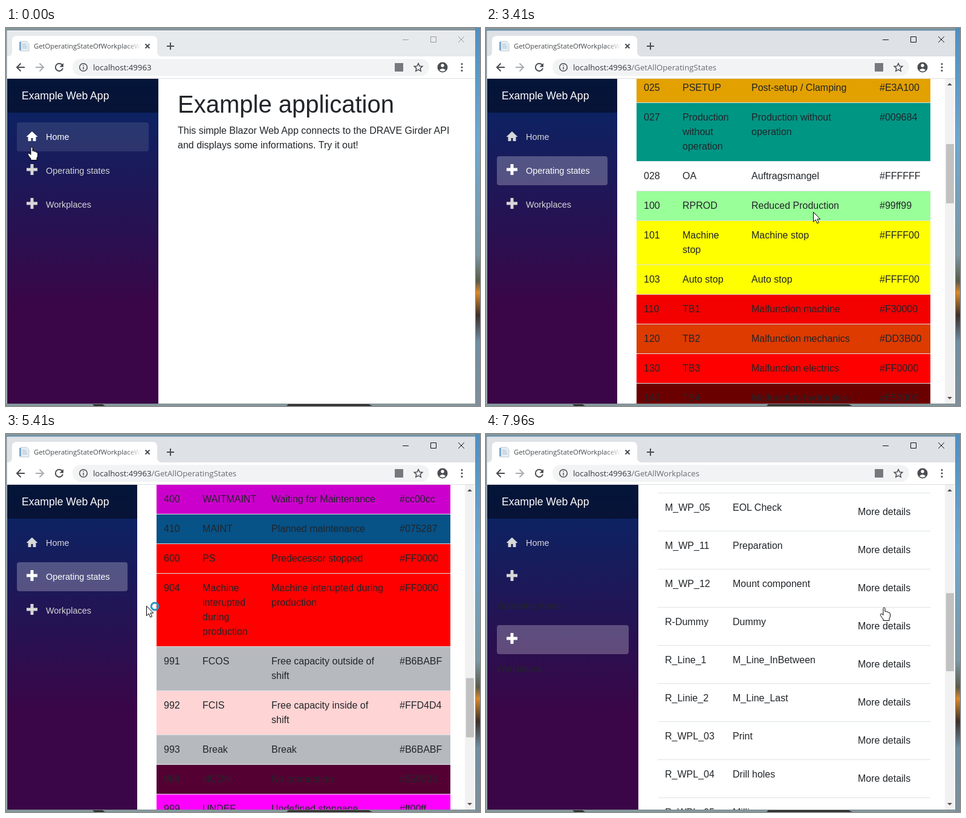
An HTML page for the animation above (8000 ms loop, 784 px wide and 625 px high).

```html
<!DOCTYPE html>
<html lang="en">
<head>
<meta charset="utf-8">
<title>Example Web App</title>
<style>
html, body { margin: 0; width: 100%; height: 100%; overflow: hidden; }
svg { display: block; width: 784px; height: 625px; font-family: "Liberation Sans", Arial, sans-serif; }
.ui { font-family: "Open Sans", "Noto Sans", sans-serif; }
.line { fill: none; stroke: #4a4d51; stroke-width: 2; }
.page { font-size: 16px; fill: #212529; }
.h1 { font-size: 40px; }
.b { font-weight: bold; }
</style>
</head>
<body>
<svg id="stage" viewBox="0 0 784 625">
  <defs>
    <linearGradient id="sky" x2="0" y2="1">
      <stop offset="0" stop-color="#4f8fc0"/><stop offset=".3" stop-color="#6fa8cf"/>
      <stop offset=".6" stop-color="#7c98a4"/><stop offset=".67" stop-color="#5b5a4a"/>
      <stop offset=".7" stop-color="#d78a2c"/><stop offset=".76" stop-color="#3c2f2a"/>
      <stop offset=".83" stop-color="#6f8fa3"/><stop offset="1" stop-color="#7f8f98"/>
    </linearGradient>
    <linearGradient id="side" gradientUnits="userSpaceOnUse" x1="0" y1="84" x2="0" y2="460">
      <stop offset="0" stop-color="#052767"/><stop offset="1" stop-color="#3a0647"/>
    </linearGradient>
    <linearGradient id="fade">
      <stop offset="0" stop-color="#fff" stop-opacity="0"/><stop offset="1" stop-color="#fff"/>
    </linearGradient>
    <clipPath id="view"><rect x="217" y="84" width="557" height="537"/></clipPath>
    <clipPath id="tabClip"><rect x="46" y="18" width="176" height="24"/></clipPath>
  </defs>

  <rect width="784" height="625" fill="#84989c"/>
  <rect x="776" width="8" height="625" fill="url(#sky)"/>
  <path d="M142 621h16l6 4h-18ZM468 621h130l8 4h-142Z" fill="#33302e"/>

  <rect x="1" y="3.5" width="775.5" height="618" fill="#fff" stroke="#7e8b92"/>
  <path id="edge" d="M1 4H776" stroke="#2f7fbd"/>
  <rect id="bar" x="2" y="4.500" width="774" height="42.500"/>
  <path d="M2 47Q10 47 10 39V21Q10 13 18 13H242Q250 13 250 21V39Q250 47 258 47Z" fill="#fff"/>
  <g id="doc">
    <path d="M24 22h10l4 4v12H24Z" fill="#e6edf3" stroke="#b4c3d0" stroke-width=".8"/>
    <path d="M22 23h3v14h-3Z" fill="#79a9d4"/>
    <path d="M27 27h6M27 30h8M27 33h8" stroke="#9db4c8"/>
  </g>
  <g id="globe">
    <circle cx="30" cy="30" r="7.500" fill="#54585d"/>
    <path d="M25 27l5-2 2 3-4 2-3 1ZM31 31l4-1-1 4-3 2Z" fill="#fff"/>
  </g>
  <text class="ui" x="46" y="34" font-size="11.300" fill="#45494d" clip-path="url(#tabClip)">GetOperatingStateOfWorkplaceW</text>
  <rect x="198" y="18" width="25" height="24" fill="url(#fade)"/>
  <path class="line" stroke-width="1.600" d="M230.500 26.500l7 7m0-7l-7 7M266 30h12m-6-6v12"/>
  <path id="buttons" fill="none" d="M656 19.500h10M702.500 14.500h9v9h-9ZM748 14l10 10m0-10l-10 10"/>

  <path class="line" d="M31 65H18.500M24.500 58.500L18 65l6.500 6.500"/>
  <path class="line" style="stroke:#a9adb1" d="M49 65H61.500M55.500 58.500L62 65l-6.500 6.500"/>
  <path class="line" d="M93.500 62A6.200 6.200 0 1 0 94 66.500"/>
  <path d="M95 58V64.500H88.500Z" fill="#4a4d51"/>
  <rect x="110" y="51" width="590" height="28" rx="14" fill="#f1f3f4"/>
  <circle class="line" style="stroke-width:1.500" cx="128" cy="65" r="6.300"/>
  <path class="line" style="stroke-width:1.500" d="M128 64v4.500M128 61v1.600"/>
  <text class="ui" x="144" y="70" font-size="13.200" fill="#33363a">localhost:49963<tspan id="path" fill="#686c71"></tspan></text>
  <rect x="643" y="58" width="14" height="14" fill="#75797d"/>
  <path class="line" style="stroke-width:1.500" d="M682 58.500l2 4.400 4.800.5-3.600 3.200 1 4.700-4.200-2.400-4.200 2.400 1-4.700-3.600-3.200 4.800-.5Z"/>
  <circle cx="722" cy="65" r="8.500" fill="#4a4d51"/>
  <circle cx="722" cy="62" r="2.700" fill="#fff"/>
  <path d="M716.800 69.500Q722 64.500 727.200 69.500 722 74 716.800 69.500Z" fill="#fff"/>
  <path d="M754 59.500h.01M754 65h.01M754 70.500h.01" stroke="#4a4d51" stroke-width="3.200" stroke-linecap="round"/>
  <path d="M2 83.500H776" stroke="#dcdee0"/>

  <g class="page" clip-path="url(#view)">
    <g id="home">
      <text class="h1" x="284" y="140">Example application</text>
      <text x="284" y="175">This simple Blazor Web App connects to the DRAVE Girder API</text>
      <text x="284" y="199">and displays some informations. Try it out!</text>
    </g>
    <g id="states"></g>
    <g id="places"></g>
  </g>

  <g id="scrollbar">
    <rect x="759" y="84" width="15" height="537" fill="#f1f1f1"/>
    <path id="up" d="M763 95l4-4 4 4Z"/>
    <path d="M763 610l4 4 4-4Z" fill="#505050"/>
    <rect id="thumb" x="761" width="13" fill="#c1c1c1"/>
  </g>

  <rect class="side" x="2" y="84" height="537" fill="url(#side)"/>
  <rect class="side" x="2" y="84" height="56" fill="#000" fill-opacity=".45"/>
  <text x="26" y="118" font-size="17.600" fill="#fff">Example Web App</text>
  <g id="nav" font-size="14.400"></g>

  <g id="bubble">
    <path d="M2 600H254Q258.500 600 258.500 604V621H2Z" fill="#fff" stroke="#d5d5d5"/>
    <text class="ui" x="7" y="615" font-size="11.300" fill="#686c71">Warten auf localhost...</text>
  </g>

  <g id="cursor" fill="#fff" stroke="#000" stroke-linejoin="round">
    <path id="arrow" d="M.5.5V16.500L4.200 13l2.600 6 2.700-1.200-2.600-5.800H11.800Z"/>
    <circle id="ring" cx="14" cy="1" r="5.800" fill="none" stroke="#3399c4" stroke-width="3.200"/>
    <path id="hand" d="M-2 1.500Q-2 0-.5 0T1 1.500V6.500Q2 5.500 3.200 6.200 4 6.600 4 7.300 5.200 6.600 6.400 7.400 7 7.800 7 8.600 9.500 7.800 9.500 10.500V14Q9.500 16 8 18V21.500H-2V19Q-4.500 16.500-6 13.500-7.600 11-5.800 10.200-4 9.800-2 12.500Z"/>
  </g>
</svg>

<script>
const $ = id => document.getElementById(id);
const LOOP = 8000;

// Bursts of screen updates: start, end, number of steps.
const BURSTS = [
  [80, 840, 11], [910, 1000, 2], [1160, 1930, 11], [2040, 2100, 2],
  [2410, 2480, 2], [2790, 3410, 9], [3710, 4180, 7], [4410, 4720, 5],
  [4950, 5720, 11], [5800, 6330, 8], [6500, 7270, 11], [7340, 7960, 9]
];

const POINTER = [
  [80, 43, 197], [540, 60, 236], [1160, 60, 236], [1860, 506, 302],
  [2340, 506, 302], [2480, 541, 304], [5180, 541, 304], [5412, 232, 284],
  [5720, 183, 300], [6500, 183, 300], [7270, 659, 287]
];
const STATES_SCROLL = [
  [1860, 0], [1930, 23], [2040, 85], [2100, 100], [2790, 113], [3410, 500],
  [3710, 513], [4180, 900], [4410, 913], [4720, 1200], [4950, 1215], [5250, 1664]
];
const PLACES_SCROLL = [[7270, 0], [7340, 20], [7960, 678]];

// code | short description | description | colour, with ~ as line break
const STATES = `-|Not~assigned|Not assigned|#FFFFFF
000|Production|Production|#00CC84
010|Waiting for~processing|Waiting for processing|#FFFFFF
11|Completed|Completed|#FFFFFF
12|Closed|Closed|#FFFFFF
020|Setup|Setup|#AA7900
025|PSETUP|Post-setup / Clamping|#E3A100
027|Production~without~operation|Production without~operation|#009684
028|OA|Auftragsmangel|#FFFFFF
100|RPROD|Reduced Production|#99ff99
101|Machine~stop|Machine stop|#FFFF00
103|Auto stop|Auto stop|#FFFF00
110|TB1|Malfunction machine|#F30000
120|TB2|Malfunction mechanics|#DD3B00
130|TB3|Malfunction electrics|#FF0000
140|TB4|Malfunction hydraulics /~pneumatics|#6B0000
150|TB5|Tool defect|#C00000
160|MP|Material Problem|#DD3B00
210|OB1|Missing tool|#FFDD00
220|OB2|Tool life expired|#DDBB00
230|OB3|Missing material|#FFB500
240|OB4|Quality issue (raw~material)|#EEA800
250|OB5|Missing personnel|#F38400
260|OB6|Missing order|#660033
300|QS|Quality check|#9966ff
310|TEST|Trial run|#66ccff
320|CLEAN|Cleaning and~inspection|#cc99ff
400|WAITMAINT|Waiting for Maintenance|#cc00cc
410|MAINT|Planned maintenance|#075287
600|PS|Predecessor stopped|#FF0000
904|Machine~interupted~during~production|Machine interupted during~production|#FF0000
991|FCOS|Free capacity outside of~shift|#B6BABF
992|FCIS|Free capacity inside of~shift|#FFD4D4
993|Break|Break|#B6BABF
988|NCON|No connection|#550033
999|UNDEF|Undefined stoppage|#ff00ff`;

const PLACES = `M_Line_1|M_Line_First
M_WPL_13|Fix side plate
M_WPL_14|Fix cover plate
M_WPL_15|EOL Tester
M_WPL_16|Packaging
M_WP_01|Assemble case
M_WP_02|Integrate motor
M_WP_03|Fit housing
M_WP_04|Screw cover
M_WP_05|EOL Check
M_WP_11|Preparation
M_WP_12|Mount component
R-Dummy|Dummy
R_Line_1|M_Line_InBetween
R_Linie_2|M_Line_Last
R_WPL_03|Print
R_WPL_04|Drill holes
R_WPL_05|Milling`;

const split = s => s.split("\n").map(r => r.split("|"));
const text = (x, y, s, cls = "") => s.split("~").map((part, i) =>
  `<text class="${cls}" x="${x}" y="${y + 24 * i}">${part}</text>`).join("");
const rect = (x, y, w, h, fill) =>
  `<rect x="${x}" y="${y}" width="${w}" height="${h}" fill="${fill}"/>`;
const rule = (x, y, h = 1) => rect(x, y, 735 - x, h, "#dee2e6");

function buildStates() {
  const cols = [261, 325, 439, 651];
  let out = text(249, 140, "Operating states", "h1") + rule(249, 158) +
    text(261, 212, "Code", "b") + text(325, 188, "Short~Description", "b") +
    text(439, 212, "Description", "b") + text(651, 212, "Color", "b");
  let y = 232;
  for (const row of split(STATES)) {
    const h = 25 + 24 * Math.max(...row.map(c => c.split("~").length));
    out += rect(249, y, 486, h, row[3]) + rule(249, y) +
      row.map((c, i) => text(cols[i], y + 30, c)).join("");
    y += h;
  }
  return out + rule(249, 231, 2);
}

function buildPlaces() {
  let out = text(284, 140, "Workplaces", "h1") + rule(284, 158) +
    text(296, 188, "Number", "b") + text(408, 188, "Description", "b") +
    text(602, 188, "...", "b") + rule(284, 207, 2);
  split(PLACES).forEach(([id, name], i) => {
    const y = 208 + 63 * i;
    out += (i ? rule(284, y) : "") + text(296, y + 30, id) +
      text(408, y + 30, name) + text(615, y + 37, "More details");
  });
  return out;
}

const HOUSE = "M43 15l-9.500 9h3v7h5v-5h3v5h5v-7h3Z";
const PLUS = "M34 19.500h6.500v-6.500h5v6.500h6.500v5h-6.500v6.500h-5v-6.500h-6.500Z";
const buildNav = () => ["Home", "Operating states", "Workplaces"].map((label, i) =>
  `<g><rect x="18" height="48" rx="4" fill="#fff"/><path d="${i ? PLUS : HOUSE}"/><text>${label}</text></g>`).join("");

$("states").innerHTML = buildStates();
$("places").innerHTML = buildPlaces();
$("nav").innerHTML = buildNav();
const sides = document.querySelectorAll(".side");

// Time of the latest screen update.
function held(t) {
  let last = 0;
  for (const [start, end, steps] of BURSTS) {
    if (t < start) break;
    const gap = (end - start) / (steps - 1);
    last = Math.min(end, start + gap * Math.floor((t - start) / gap + 0.1));
  }
  return last;
}

const smooth = u => u * u * (3 - 2 * u);

function track(keys, t, ease = u => u) {
  if (t <= keys[0][0]) return keys[0].slice(1);
  for (let i = 1; i < keys.length; i++) {
    const [a, b] = [keys[i - 1], keys[i]];
    if (t < b[0]) {
      const u = ease((t - a[0]) / (b[0] - a[0]));
      return a.slice(1).map((v, k) => v + (b[k + 1] - v) * u);
    }
  }
  return keys[keys.length - 1].slice(1);
}

function set(el, attrs) {
  for (const k in attrs) el.setAttribute(k, attrs[k]);
}
const show = (id, on) => set($(id), { visibility: on ? "visible" : "hidden" });

function drawNav(page, width, x, y) {
  [...$("nav").children].forEach((item, i) => {
    const [box, icon, label] = item.children;
    const loose = page === 2 && i > 0;
    const top = page === 2 && i === 2 ? 316 : 156 + 56 * i;
    const active = page > 0 && i === page;
    const hover = x < width - 14 && (y > top && y < top + 48 || page === 0 && i === 0 && y < 212);
    const tint = active || hover ? "#fff" : "#d7d7d7";
    set(box, { y: top, width: width - 32, "fill-opacity": active ? 0.25 : hover ? 0.1 : 0 });
    set(icon, { transform: `translate(0 ${top})`, fill: tint });
    set(label, loose ? { x: 18, y: top + 77, fill: "#212529" } : { x: 66, y: top + 29, fill: tint });
  });
}

function render(time) {
  const t = held(time);
  const page = t < 910 ? 0 : t < 6020 ? 1 : 2;
  const loading = t >= 840 && t < 1000 || t >= 5870 && t < 6330;
  const focused = t >= 530;
  const width = page === 1 ? 215 : 250;

  show("edge", focused);
  set($("bar"), { fill: focused ? "#dee1e6" : "#e7eaed" });
  set($("buttons"), { stroke: focused ? "#111" : "#999" });
  show("doc", !loading);
  show("globe", loading);
  show("bubble", loading);
  $("path").textContent = ["", "/GetAllOperatingStates", "/GetAllWorkplaces"][page];

  ["home", "states", "places"].forEach((id, i) => show(id, i === page));
  const [scroll] = track(page === 2 ? PLACES_SCROLL : STATES_SCROLL, t);
  const shift = { transform: `translate(0 ${-Math.round(scroll)})` };
  set($("states"), shift);
  set($("places"), shift);

  show("scrollbar", page > 0);
  set($("thumb"), { y: 101 + scroll / (page === 2 ? 4.18 : 5.5), height: page === 2 ? 129 : 98 });
  set($("up"), { fill: scroll > 0 ? "#505050" : "#a3a3a3" });

  const [x, y] = track(POINTER, t, smooth).map(Math.round);
  sides.forEach(el => set(el, { width }));
  drawNav(page, width, x, y);

  const hand = x < 201 || x > 610;
  set($("cursor"), { transform: `translate(${x} ${y})` });
  show("hand", hand);
  show("arrow", !hand);
  show("ring", !hand && t >= 4410 && t < 5600);
}

function tick() {
  render(performance.now() % LOOP);
  requestAnimationFrame(tick);
}
tick();
</script>
</body>
</html>
```
